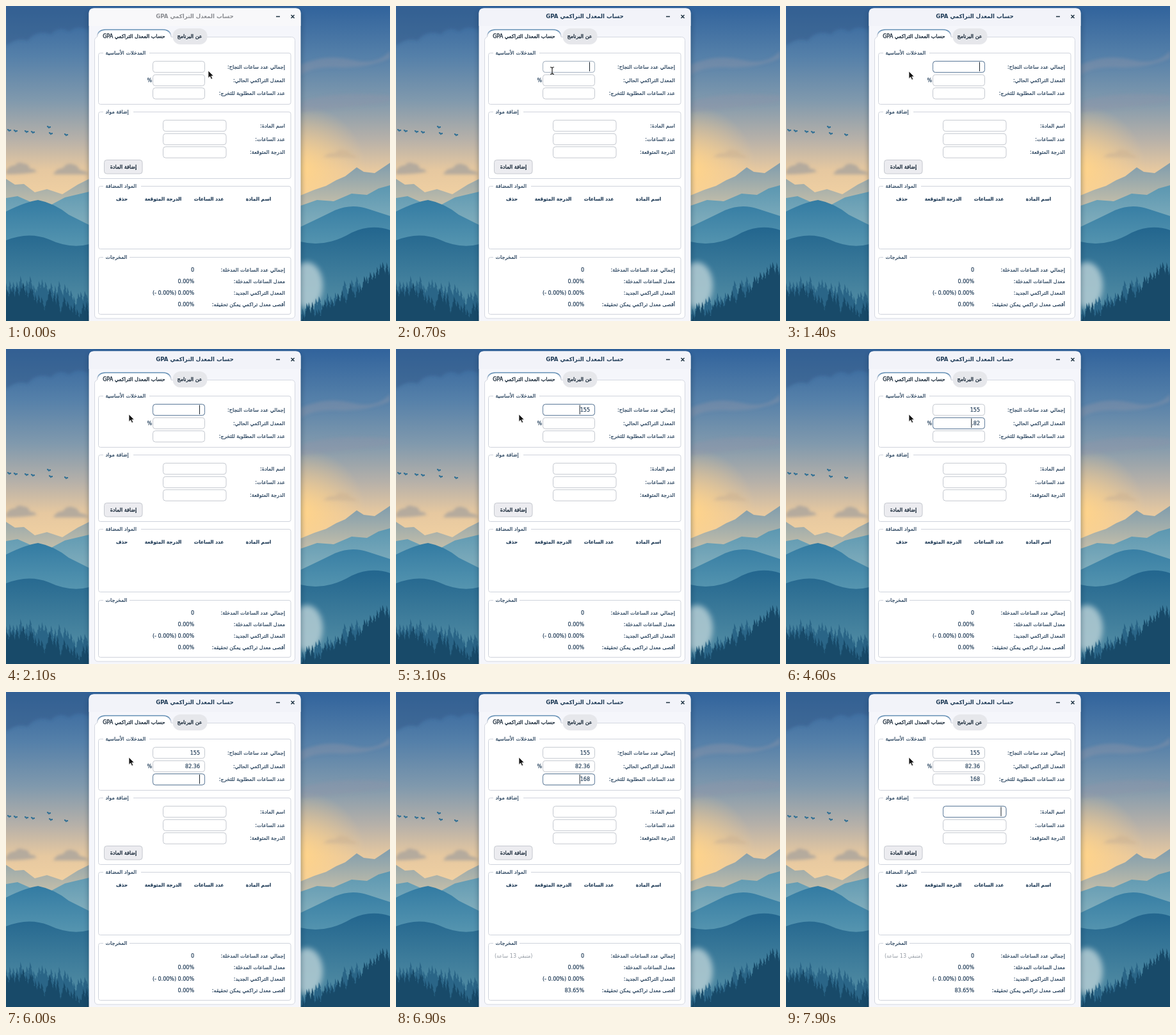
These frames come from a looping animation (600 px wide and 492 px high, 8000 ms). An HTML page:

```html
<!DOCTYPE html>
<html lang="ar">
<head>
<meta charset="utf-8">
<title>حساب المعدل التراكمي</title>
<style>
html, body { margin: 0; width: 100%; height: 100%; overflow: hidden; }
svg { display: block; width: 600px; height: 492px; }
text { font: 8px "DejaVu Sans", sans-serif; fill: #1f3b57; stroke: #1f3b57; stroke-width: .2; direction: ltr; }
.rtl { direction: rtl; }
.bold { font-weight: bold; font-size: 7.4px; }
.title { font-weight: bold; font-size: 8.6px; stroke: none; animation: wake 8s step-end infinite; }
.tab { fill: #1a2a3a; stroke: #1a2a3a; stroke-width: .35; }
.faint { fill: #939aa3; stroke: none; }
.bar { animation: bar 8s step-end infinite; }
.group { fill: none; stroke: #cfd3dc; }
.box { fill: #fff; stroke: #c4c8cf; }
.ring { fill: none; stroke: #62809f; opacity: 0; }
.pointer { animation: move 8s linear infinite; }
.arrow { animation: arrow 8s step-end infinite; }
.beam { animation: beam 8s step-end infinite; }
@keyframes wake { 0% { fill: #8b8d92; } 6.25% { fill: #1f3b57; } }
@keyframes bar { 0% { fill: #f8f8fa; } 6.25% { fill: #f2f3f9; } }
@keyframes move {
  0% { transform: translate(316px, 101px); animation-timing-function: ease-in-out; }
  6.25%, 11.25% { transform: translate(244px, 101px); }
  16.25%, 100% { transform: translate(192px, 102px); }
}
@keyframes arrow { 0% { opacity: 1; } 1.9% { opacity: 0; } 12.7% { opacity: 1; } }
@keyframes beam { 0% { opacity: 0; } 1.9% { opacity: 1; } 12.7% { opacity: 0; } }
</style>
</head>
<body>
<svg viewBox="0 0 600 492">
  <defs>
    <linearGradient id="sky" x2="0" y2="1">
      <stop offset="0" stop-color="#31639c"/>
      <stop offset=".16" stop-color="#5580a9"/>
      <stop offset=".3" stop-color="#8099ad"/>
      <stop offset=".42" stop-color="#b5b0a9"/>
      <stop offset=".52" stop-color="#e6c8a0"/>
      <stop offset=".6" stop-color="#f0d0a2"/>
    </linearGradient>
    <radialGradient id="glow" gradientUnits="userSpaceOnUse" cx="462" cy="255" r="100">
      <stop offset="0" stop-color="#ffd48a"/>
      <stop offset="1" stop-color="#ffd08c" stop-opacity="0"/>
    </radialGradient>
    <linearGradient id="far" gradientUnits="userSpaceOnUse" x1="0" x2="0" y1="245" y2="310">
      <stop offset="0" stop-color="#7f9dad"/>
      <stop offset="1" stop-color="#c3bda9"/>
    </linearGradient>
    <linearGradient id="mid" gradientUnits="userSpaceOnUse" x1="0" x2="0" y1="280" y2="350">
      <stop offset="0" stop-color="#5b97b1"/>
      <stop offset="1" stop-color="#86b0bd"/>
    </linearGradient>
    <linearGradient id="near" gradientUnits="userSpaceOnUse" x1="0" x2="0" y1="305" y2="390">
      <stop offset="0" stop-color="#347ca3"/>
      <stop offset="1" stop-color="#5d9ab2"/>
    </linearGradient>
    <linearGradient id="hill" gradientUnits="userSpaceOnUse" x1="0" x2="0" y1="350" y2="450">
      <stop offset="0" stop-color="#24678f"/>
      <stop offset="1" stop-color="#4a86a0"/>
    </linearGradient>
    <linearGradient id="tabEdge" gradientUnits="userSpaceOnUse" x1="0" x2="0" y1="39" y2="46">
      <stop offset="0" stop-color="#6590b5"/>
      <stop offset="1" stop-color="#d5d8e1"/>
    </linearGradient>
    <filter id="blur" x="-20%" width="140%"><feGaussianBlur stdDeviation="4"/></filter>
    <filter id="soft" x="-20%" y="-20%" width="140%" height="140%"><feGaussianBlur stdDeviation="2"/></filter>
  </defs>

  <rect width="600" height="492" fill="url(#sky)"/>
  <rect width="600" height="492" fill="url(#glow)"/>
  <g filter="url(#soft)">
    <path d="M0 0H130V38Q112 28 98 40Q84 30 70 44Q48 36 34 54Q18 48 0 62z" fill="#365d8b" opacity=".55"/>
    <path d="M460 92Q500 74 540 84T600 70V82Q560 98 520 96T460 108zM460 150Q510 132 600 140V150Q520 160 460 166z" fill="#8d93a8" opacity=".4"/>
    <path d="M0 257q6-9 14-8q5-7 13-3q9 0 10 8q8 0 11 5q-20 4-48 4zM74 263q5-10 15-10q6-9 15-6q9 2 11 9q8 0 14 7z" fill="#a9a49d" opacity=".8"/>
    <path d="M496 236q9-8 18-6q5-8 14-5q9 0 11 7q7 0 9 5z" fill="#cfb596" opacity=".7"/>
  </g>
  <path fill="url(#far)" d="M0 270L14 279L28 278L45 291L64 286L88 294L112 279L130 270V340H0zM460 296L482 287L500 281L516 272L530 266L548 252L559 259L576 261L600 245V350H460z"/>
  <path fill="url(#mid)" d="M0 300L18 297L34 304L60 316L92 299L130 290V400H0zM460 312L486 303L512 305L540 293L564 295L582 285L600 280V400H460z"/>
  <path fill="url(#near)" d="M0 321Q30 306 50 303Q76 308 98 326L130 342V430H0zM460 345Q492 330 514 319Q540 308 566 317L600 328V430H460z"/>
  <path fill="url(#hill)" d="M0 366Q35 352 66 364Q100 380 130 372V492H0zM460 368Q500 378 540 354Q570 340 600 350V492H460z"/>
  <ellipse cx="470" cy="436" rx="25" ry="36" fill="#b4cdd4" opacity=".85" filter="url(#blur)"/>
  <path id="backTrees" fill="#2a6587"/>
  <path id="frontTrees" fill="#184a69"/>
  <g id="birds" fill="none" stroke="#2f6f94" stroke-width="1.8"></g>

  <rect x="130" y="7" width="330.500" height="500" rx="9" fill="#0b2338" opacity=".45" filter="url(#blur)"/>
  <path d="M129.500 500V11.500q0-8 8-8H452.500q8 0 8 8V500z" fill="#f5f6fb"/>
  <path class="bar" d="M129.500 31V11.500q0-8 8-8H452.500q8 0 8 8V31z"/>
  <path d="M422 16.500h6M445.500 14l5 5m0-5l-5 5" stroke="#1f3342" stroke-width="1.5"/>
  <rect x="138.500" y="48.500" width="313" height="439.500" rx="5" fill="#fff" stroke="#d5d8e1"/>
  <path d="M142.500 52V47q1-10 13-10H245q12 0 13 10v5z" fill="#fff"/>
  <path d="M142.500 48q1-11 13-11H245q12 0 13 11" fill="none" stroke="url(#tabEdge)" stroke-width="1.6"/>
  <rect x="260.500" y="35" width="54" height="25" rx="12" fill="#e6e7eb"/>
  <g id="form"></g>
  <rect x="153.500" y="240.500" width="59.500" height="21.500" rx="4" fill="#ececf0" stroke="#c6c9cf"/>
  <g id="labels"></g>
  <path id="caret" stroke="#17212b" stroke-width="1"/>
  <g class="pointer">
    <path class="arrow" d="M0 0V11.500L2.700 9L4.600 13.300L6.700 12.400L4.800 8.300H8.300z" fill="#151515" stroke="#fff" stroke-width=".7"/>
    <path class="beam" d="M-3-5.500Q0-5.500 0-3.500Q0-5.500 3-5.500M0-4V4M-3 5.500Q0 5.500 0 3.500Q0 5.500 3 5.500" fill="none" stroke="#222" stroke-width="1.2"/>
  </g>
</svg>
<script>
const LOOP = 8000;
const $ = id => document.getElementById(id);

function add(parent, name, attrs, content = '') {
  const el = document.createElementNS('http://www.w3.org/2000/svg', name);
  for (const key in attrs) el.setAttribute(key, attrs[key]);
  el.textContent = content;
  return parent.appendChild(el);
}

// For rtl text, "start" is the right edge and "end" the left one.
function label(content, x, y, anchor = 'start', cls = '') {
  return add($('labels'), 'text', { x, y: y + 2.9, 'text-anchor': anchor, class: 'rtl ' + cls }, content);
}
function number(content, x, y) {
  return add($('labels'), 'text', { x, y: y + 2.9, 'text-anchor': 'end' }, content);
}

// Forests
let seed = 7;
const random = () => (seed = seed * 16807 % 2147483647) / 2147483647;
function forest(id, left, right, spread) {
  let d = '';
  const tree = (x, top) => {
    const w = 4 + random() * 3;
    d += `M${x} ${top}`;
    for (let i = 1; i < 5; i++) d += `l${w * .5} 9l${-w * .2} 0`;
    d += `L${x + w} 492H${x - w}L${x - w * 1.2} ${top + 36}`;
    for (let i = 1; i < 5; i++) d += `l${w * .2} 0L${x - w * .3 * (4 - i)} ${top + 9 * (4 - i)}`;
    d += 'z';
  };
  for (let x = 0; x < 130; x += 5) tree(x + random() * 3, left(x) + random() * spread);
  for (let x = 462; x < 604; x += 5) tree(x + random() * 3, right(x) + random() * spread);
  $(id).setAttribute('d', d);
}
forest('backTrees', x => 412 + x * .2, x => 464 - (x - 462) * .55, 22);
forest('frontTrees', x => 420 + x * .32, x => 468 - (x - 462) * .55, 22);

for (const [x, y] of [[5, 195], [15, 196], [32, 197], [42, 198], [67, 190], [70, 200], [94, 202]])
  add($('birds'), 'path', { d: `M${x - 3} ${y - 2}q2 0 3 2q1-1 3-1` });

// Groups with their legends
for (const [top, bottom, gap, name] of [
  [73, 154, 224, 'المدخلات الأساسية'],
  [165, 270, 199, 'إضافة مواد'],
  [281, 380, 211, 'المواد المضافة'],
  [392, 482, 193, 'المخرجات']
]) {
  add($('form'), 'rect', { class: 'group', x: 144.5, y: top + .5, width: 300.5, height: bottom - top - 1, rx: 3 });
  add($('form'), 'rect', { x: 152, y: top - 2, width: gap - 152, height: 5, fill: '#fff' });
  label(name, 155.5, top, 'end');
}

label('حساب المعدل التراكمي GPA', 295, 16.5, 'middle', 'title');
label('حساب المعدل التراكمي GPA', 200, 47.5, 'middle', 'tab');
label('عن البرنامج', 287, 47.5, 'middle', 'tab');
label('إضافة المادة', 183.5, 251, 'middle', 'tab');
number('%', 228, 116);

for (const [name, x] of [['اسم المادة', 394.5], ['عدد الساعات', 317], ['الدرجة المتوقعة', 245.5], ['حذف', 181]])
  label(name, x, 301.5, 'middle', 'bold');

// Input fields
const fields = [
  ['إجمالي عدد ساعات النجاح:', 95, 229.5, 81],
  ['المعدل التراكمي الحالي:', 116, 229.5, 81],
  ['عدد الساعات المطلوبة للتخرج:', 136.5, 229.5, 81],
  ['اسم المادة:', 187, 245.5, 98.5],
  ['عدد الساعات:', 208, 245.5, 98.5],
  ['الدرجة المتوقعة:', 228.5, 245.5, 98.5]
].map(([name, y, x, width]) => {
  const shape = { x, y: y - 8.7, width, height: 17.4, rx: 4 };
  add($('form'), 'rect', { ...shape, class: 'box' });
  const ring = add($('form'), 'rect', { ...shape, class: 'ring' });
  label(name, 436, y);
  const right = x + width - 7.5;
  return { y, right, ring, text: number('', right, y) };
});

// Results
const results = [
  ['إجمالي عدد الساعات المدخلة:', '0'],
  ['معدل الساعات المدخلة:', '0.00%'],
  ['المعدل التراكمي الجديد:', '(- 0.00%) 0.00%'],
  ['أقصى معدل تراكمي يمكن تحقيقه:', '0.00%']
].map(([name, value], i) => {
  label(name, 436, 412 + i * 18);
  return number(value, 294, 412 + i * 18);
});
const best = results[3];
const remaining = label('(متبقي 13 ساعة)', 213.5, 412, 'start', 'faint');

// [time, content] for each field, and [time, field] for the focus
const typing = [
  [[2400, '1'], [2700, '15'], [3000, '155']],
  [[4100, '8'], [4300, '82'], [4600, '.82'], [4800, '82.3'], [5100, '82.36']],
  [[6100, '1'], [6400, '16'], [6800, '168']]
];
const focus = [[600, 0], [3700, 1], [5600, 2], [7200, 3]];

const at = (steps, t, initial) => steps.reduce((v, [time, next]) => t >= time ? next : v, initial);
const clamp = v => Math.max(0, Math.min(1, v));

function bestRate(hours) {
  if (!hours) return '0.00%';
  const rate = (155 * 82.36 + (hours - 155) * 99) / hours;
  return Math.abs(rate).toFixed(2) + '%' + (rate < 0 ? '-' : '');
}

function draw(t) {
  typing.forEach((steps, i) => fields[i].text.textContent = at(steps, t, ''));
  focus.forEach(([start, i], n) => {
    const end = n + 1 < focus.length ? focus[n + 1][0] : Infinity;
    fields[i].ring.style.opacity = clamp((t - start) / 300) * (1 - clamp((t - end) / 300));
  });

  const active = fields[at(focus, t, -1)];
  $('caret').style.display = active ? '' : 'none';
  if (active) {
    const width = active.text.textContent ? active.text.getComputedTextLength() : 0;
    $('caret').setAttribute('d', `M${active.right - .5 - width} ${active.y - 7.500}v14.500`);
  }

  const hours = +at(typing[2], t, 0);
  best.textContent = bestRate(hours);
  remaining.style.display = hours > 155 ? '' : 'none';
}

let start;
function tick(now) {
  start ??= now;
  draw((now - start) % LOOP);
  requestAnimationFrame(tick);
}
draw(0);
requestAnimationFrame(tick);
</script>
</body>
</html>
```
